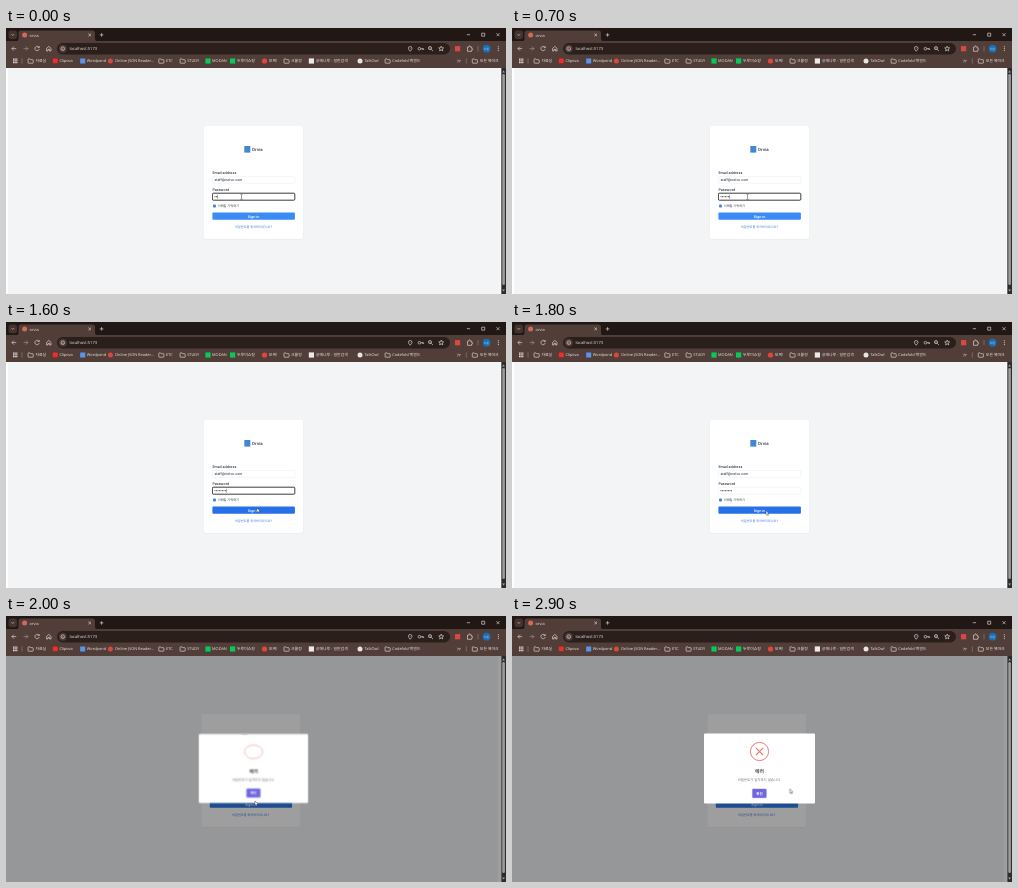
These frames come from a looping animation (500 by 266 pixels, 3 s). An HTML page:

```html
<!DOCTYPE html>
<html lang="ko">
<head>
<meta charset="utf-8">
<title>Sign in</title>
<style>
  html, body { margin: 0; width: 100%; height: 100%; overflow: hidden; background: #fff; }
  svg { display: block; width: 100vw; height: 100vh; }
  text { font-family: "Open Sans", "Noto Sans CJK KR", "Noto Sans CJK", sans-serif; text-rendering: geometricPrecision; }
  .line { fill: none; stroke: #e6dcd8; stroke-width: .65; }
  .bar text { font-size: 3.9px; fill: #eee6e3; }
  .page text, .modal text { font-family: Inter, "Noto Sans CJK KR", "Noto Sans CJK", sans-serif; }
  .label { font-size: 3.6px; font-weight: 500; fill: #222b38; }
  .mid { text-anchor: middle; }
  .field { fill: #fff; stroke: #dfe2e6; stroke-width: .35; }

  .page, .shade, .modal, .icon, .cross, .typed, .focus, .signin, .ibeam, .arrow, .confirm {
    animation: 3s step-end infinite;
  }
  .page { animation-name: shift; }
  .typed { animation-name: type; }
  .focus { animation-name: blur; }
  .signin { animation-name: hover; }
  .ibeam { animation-name: ibeam; }
  .arrow { animation-name: point; }
  .shade { animation-name: dim; }
  .modal { animation-name: pop; transform-origin: 247.5px 152.5px; }
  .icon { animation-name: flip; transform-origin: 247.5px 135.5px; }
  .cross { animation-name: cross; transform-origin: 247.5px 135.5px; }
  .confirm { animation-name: confirm; }

  @keyframes shift { 0% { transform: none; } 63.33%, 100% { transform: matrix(1, 0, 0, 1, -2.7, 0); } }
  @keyframes type {
    0% { transform: matrix(1, 0, 0, 1, 3, 0); }
    3.33% { transform: matrix(1, 0, 0, 1, 4.5, 0); }
    6.66% { transform: matrix(1, 0, 0, 1, 6, 0); }
    13.33% { transform: matrix(1, 0, 0, 1, 7.5, 0); }
    16.66% { transform: matrix(1, 0, 0, 1, 9, 0); }
    26.66% { transform: matrix(1, 0, 0, 1, 10.5, 0); }
    36.66%, 100% { transform: matrix(1, 0, 0, 1, 12, 0); }
  }
  @keyframes blur { 0% { opacity: 1; } 56.66%, 100% { opacity: 0; } }
  @keyframes hover { 0% { fill: #3b8bf6; } 53.33% { fill: #2670e8; } 63.33%, 100% { fill: #2f7cea; } }
  @keyframes ibeam {
    0% { transform: none; opacity: 1; }
    46.66% { transform: matrix(1, 0, 0, 1, 2, 2); opacity: 1; }
    50%, 100% { opacity: 0; }
  }
  @keyframes point {
    0% { opacity: 0; }
    50% { opacity: 1; x: 244px; y: 178px; }
    53.33% { opacity: 1; x: 251px; y: 186px; }
    56.66% { opacity: 1; x: 254px; y: 188.5px; }
    63.33% { opacity: 1; x: 252.5px; y: 188px; }
    66.66% { opacity: 1; x: 249px; y: 185px; }
    70% { opacity: 1; x: 245px; y: 180.5px; }
    73.33% { opacity: 1; x: 241.5px; y: 176.5px; }
    76.66% { opacity: 1; x: 240px; y: 174.3px; }
    93.33% { opacity: 1; x: 262px; y: 174px; }
    96.66%, 100% { opacity: 1; x: 277.8px; y: 172.8px; }
  }
  @keyframes dim { 0% { opacity: 0; } 63.33%, 100% { opacity: .38; } }
  @keyframes pop {
    0% { opacity: 0; }
    63.33% { opacity: 1; transform: scale(.98); }
    66.66% { opacity: 1; transform: scale(.985); }
    70%, 100% { opacity: 1; transform: none; }
  }
  @keyframes flip {
    0% { opacity: 0; transform: scaleY(.2); }
    63.33% { opacity: .04; transform: scaleY(.2); }
    66.66% { opacity: .6; transform: scaleY(.77); }
    70% { opacity: .88; transform: scaleY(.98); }
    73.33% { opacity: .97; transform: none; }
    76.66%, 100% { opacity: 1; transform: none; }
  }
  @keyframes cross {
    0% { opacity: 0; }
    70% { opacity: .3; transform: matrix(.62, 0, 0, .62, 0, 3.4); }
    73.33% { opacity: .9; transform: matrix(1.13, 0, 0, 1.13, 0, -1.1); }
    76.66%, 100% { opacity: 1; transform: none; }
  }
  @keyframes confirm { 0% { fill: #7066e0; } 73.33% { fill: #655cca; } 93.33%, 100% { fill: #7066e0; } }
</style>
</head>
<body>
<svg viewBox="0 0 500 266" preserveAspectRatio="none">
  <defs>
    <path id="folder" class="line" d="M.3 .8q0-.5 .5-.5h1.4l.7 .8h2q.5 0 .5 .5v2.5q0 .5-.5 .5h-4.1q-.5 0-.5-.5z"/>
    <path id="pointer" d="M0 0V4.4L1 3.5 1.7 5.1 2.4 4.8 1.7 3.2H3.1Z" fill="#fff" stroke="#111" stroke-width=".35"/>
  </defs>

  <!-- login page -->
  <rect y="39" width="495.5" height="227" fill="#fff"/>
  <g class="page">
    <rect x="2" y="40" width="492.5" height="226" fill="#f3f4f5"/>
    <rect x="197.7" y="98.2" width="99.6" height="113.4" rx="2" fill="#e8eaec"/>
    <rect x="198" y="98" width="99" height="113" rx="2" fill="#fff"/>
    <rect x="238.3" y="118" width="6" height="6.6" fill="#4187d6"/>
    <text x="245.8" y="122.6" font-size="4.2" font-weight="600" fill="#29364a">Orvia</text>
    <text class="label" x="206.4" y="146">Email address</text>
    <rect class="field" x="206.4" y="148.6" width="82.4" height="7" rx="1"/>
    <text x="208.4" y="153.2" font-size="3.5" fill="#1f2430">staff@nelvo.com</text>
    <text class="label" x="206.4" y="163">Password</text>
    <rect class="field" x="206.4" y="165.2" width="82.4" height="7" rx="1"/>
    <path d="M209 168.7h10.6" stroke="#222" stroke-width="1" stroke-linecap="round" stroke-dasharray="0 1.5"/>
    <g class="typed">
      <rect x="208.3" y="166.3" width="14" height="4.8" fill="#fff"/>
      <path class="focus" d="M208.4 166.8v3.8" stroke="#111" stroke-width=".4"/>
    </g>
    <rect class="focus" x="206.4" y="165.2" width="82.4" height="7" rx="1" fill="none" stroke="#111" stroke-width=".8"/>
    <rect x="207" y="176.5" width="3" height="3" rx="1" fill="#3f82d8"/>
    <text x="211.8" y="179.2" font-size="3.15" fill="#2c333e">이메일 기억하기</text>
    <rect class="signin" x="206.4" y="184.6" width="82.5" height="7.2" rx="1"/>
    <text class="mid" x="247.6" y="189.5" font-size="3.5" font-weight="600" fill="#fff">Sign in</text>
    <text class="mid" x="247.5" y="199.5" font-size="3.15" fill="#3b79dc">비밀번호를 잊어버리셨나요?</text>
  </g>
  <rect class="shade" y="39" width="495.5" height="227"/>

  <!-- error dialog -->
  <g class="modal">
    <rect x="192" y="117.6" width="111" height="70" rx="1.1" fill="#fff"/>
    <g class="icon" fill="none" stroke="#ee6f66">
      <circle cx="247.5" cy="135.5" r="9.1" stroke-width=".9"/>
      <path class="cross" d="M243.9 131.9l7.2 7.2m0-7.2l-7.2 7.2" stroke-width="1.1"/>
    </g>
    <text class="mid" x="247.5" y="156.9" font-size="4.9" font-weight="600" fill="#484848">에러</text>
    <text class="mid" x="247.4" y="165.1" font-size="3.4" fill="#707070">비밀번호가 일치하지 않습니다.</text>
    <rect x="239.9" y="172.5" width="15" height="9.8" rx="1.3" fill="#7066e0" opacity=".4"/>
    <rect class="confirm" x="240.5" y="173.1" width="13.8" height="8.6" rx=".9"/>
    <text class="mid" x="247.4" y="178.7" font-size="3.5" font-weight="600" fill="#fff">확인</text>
  </g>

  <!-- scrollbar -->
  <rect x="495.3" y="39" width="4.7" height="227" fill="#2c2c2c"/>
  <rect x="496.3" y="46" width="2.6" height="211" rx="1.3" fill="#9d9d9d"/>
  <path d="M496.2 44.4l1.4-2 1.4 2zM496.2 261.6l1.4 2 1.4-2z" fill="#aaa"/>

  <!-- browser frame -->
  <g class="bar">
    <rect width="500" height="14" fill="#211715"/>
    <rect y="13" width="500" height="27" fill="#523e38"/>
    <rect x="2.5" y="2.6" width="8.6" height="8.6" rx="2.4" fill="#44332e"/>
    <path class="line" d="M5.5 6.2l1.3 1.3 1.3-1.3"/>
    <path d="M10 13.2q2.5 0 2.5-2.5V5q0-2.6 2.6-2.6h71.3q2.6 0 2.6 2.6v5.7q0 2.5 2.5 2.5z" fill="#523e38"/>
    <circle cx="18.6" cy="6.9" r="2.5" fill="#d3695a"/>
    <text x="23.6" y="8.5">orvia</text>
    <path class="line" d="M82.4 5.6l2.6 2.6m0-2.6l-2.6 2.6M93.8 6.9h3.6M95.6 5.1v3.6"/>
    <path class="line" d="M460.8 6.7h3.2M475.7 5.2h3v3h-3zM490.5 5.2l3 3m0-3l-3 3"/>

    <!-- toolbar -->
    <path class="line" d="M10.2 20.6H5.9m2-2l-2 2 2 2"/>
    <path class="line" d="M17.6 20.6h4.3m-2-2l2 2-2 2" opacity=".55"/>
    <path class="line" d="M33 19.4a2.2 2.2 0 1 0 .2 1.8M33.2 18v1.6h-1.6"/>
    <path class="line" d="M40.6 20.4l2.2-2 2.2 2v2.6h-1.4v-1.6H42V23h-1.4z"/>
    <rect x="51" y="15" width="393" height="11.4" rx="5.7" fill="#2b1f1c"/>
    <circle cx="56.8" cy="20.7" r="4" fill="#4b3a35"/>
    <circle class="line" cx="56.8" cy="20.7" r="1.8"/>
    <path class="line" d="M56.8 20.4v1.3"/>
    <text x="63.5" y="22.2" style="font-size:4.1px">localhost:5173</text>
    <path class="line" d="M404.2 23.3q-1.8-2-1.8-3a1.8 1.8 0 0 1 3.6 0q0 1-1.8 3zM404.2 20v.5"/>
    <path class="line" d="M414.8 20.7h2.8v1.3m-1.3-1.3v1.1"/>
    <circle class="line" cx="413.4" cy="20.7" r="1.3"/>
    <circle class="line" cx="424" cy="20.1" r="1.6"/>
    <path class="line" d="M425.2 21.3l1.8 1.8M423.2 20.1h1.6"/>
    <path class="line" d="M435.2 18.1l.7 1.7 1.8.1-1.4 1.2.5 1.8-1.6-1-1.6 1 .5-1.8-1.4-1.2 1.8-.1z"/>
    <rect x="449" y="18.1" width="5.2" height="5.2" fill="#d94943"/>
    <path class="line" d="M461.5 19.1h1.3q0-1.2 .8-1.2t.8 1.2h1.3v1.4q1 0 1 .7t-1 .7v1.4h-4.2z"/>
    <path class="line" d="M472 18v5.4" opacity=".4"/>
    <circle cx="480.6" cy="20.7" r="3.9" fill="#176fb7"/>
    <text class="mid" x="480.6" y="21.7" style="font-size:2.8px">다온</text>
    <path d="M492.3 18.8v4" stroke="#eee" stroke-width="1" stroke-linecap="round" stroke-dasharray="0 1.9"/>

    <!-- bookmarks -->
    <path d="M7 31.1h4.4M7 32.9h4.4M7 34.7h4.4" stroke="#e6dcd8" stroke-width="1.2" stroke-dasharray="1.2 .4"/>
    <path class="line" d="M16 30.3v5.4M460.3 30.3v5.4" opacity=".4"/>
    <use href="#folder" x="21.8" y="30.6"/><text x="29.4" y="34.4">자료실</text>
    <rect x="46.8" y="30.6" width="5" height="4.6" rx="1" fill="#f22b2b"/><text x="53.5" y="34.4">Clipova</text>
    <rect x="74.2" y="30.5" width="5" height="5" fill="#5b94ee"/><text x="80.8" y="34.4">Wordpond</text>
    <circle cx="104.4" cy="33" r="2.5" fill="#d8483e"/><text x="109" y="34.4">Online JSON Reader...</text>
    <use href="#folder" x="152.5" y="30.6"/><text x="160" y="34.4">ETC</text>
    <use href="#folder" x="173.8" y="30.6"/><text x="181.2" y="34.4">STUDY</text>
    <rect x="199.4" y="30.4" width="5.2" height="5.2" fill="#08c75b"/><text x="206.1" y="34.4">MODAN</text>
    <rect x="224" y="30.4" width="5.2" height="5.2" fill="#08c75b"/><text x="231" y="34.4">두루미쇼핑</text>
    <circle cx="258.5" cy="33" r="2.6" fill="#e6443b"/><text x="262.8" y="34.4">모찌!</text>
    <use href="#folder" x="277.7" y="30.6"/><text x="285" y="34.4">크롤링</text>
    <rect x="302.8" y="30.4" width="5.2" height="5.2" fill="#eee9e7"/><text x="309.8" y="34.4">공매나루 - 일반검색</text>
    <circle cx="354" cy="33" r="2.5" fill="#e9e4e2"/><text x="358.4" y="34.4">TalkOwl</text>
    <use href="#folder" x="378.8" y="30.6"/><text x="386.2" y="34.4">Codefold 백엔드</text>
    <path class="line" d="M451.4 31.8l1.2 1.2-1.2 1.2m1.8-2.4l1.2 1.2-1.2 1.2"/>
    <use href="#folder" x="466" y="30.6"/><text x="473.8" y="34.4">모든 북마크</text>
  </g>

  <!-- mouse -->
  <path class="ibeam" d="M234.5 166.3q1 0 1 .6v4q0 .6-1 .6m2-5.2q-1 0-1 .6m1 4.6q-1 0-1-.6" fill="none" stroke="#111" stroke-width=".4"/>
  <use class="arrow" href="#pointer"/>
</svg>
</body>
</html>
```
